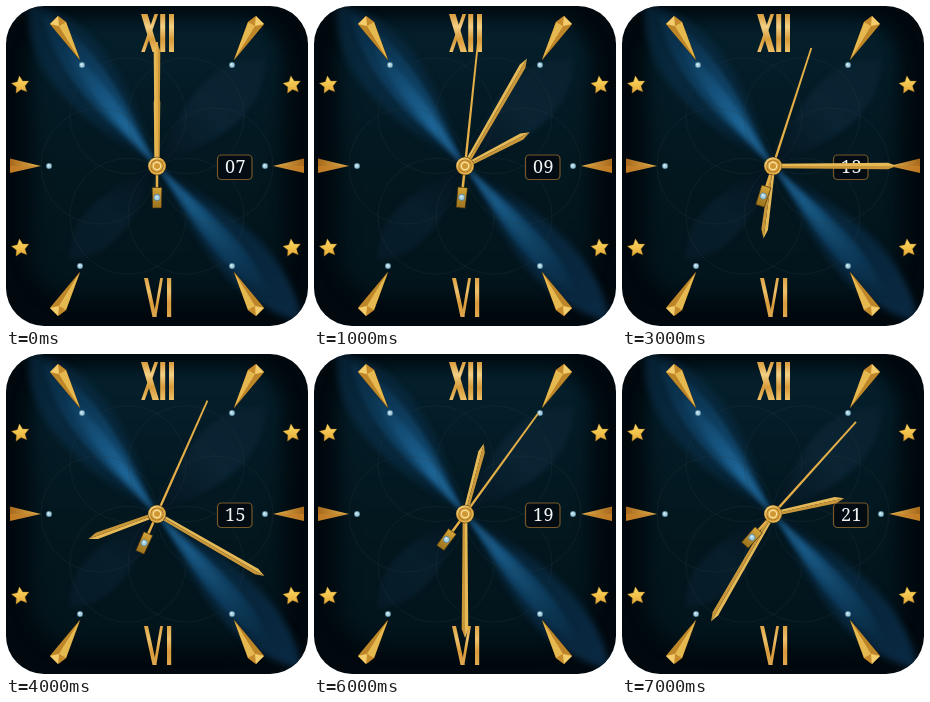
An HTML page with a canvas for the animation above (8 s loop, 302 px wide and 320 px high).

```html
<!DOCTYPE html>
<html lang="en">
<head>
<meta charset="utf-8">
<title>Deco watch face</title>
<style>
html, body { margin: 0; width: 100%; height: 100%; overflow: hidden; background: #fff; }
canvas { display: block; width: 302px; height: 320px; }
</style>
</head>
<body>
<canvas id="face" width="302" height="320"></canvas>
<script>
const W = 302, H = 320, CX = 151, CY = 160, RAD = Math.PI / 180;
const STEP = 1000, STEPS = 8;
const LIGHT = '#f3cc6c', GOLD = '#dda53d', EDGE = '#3b2809';

const view = document.getElementById('face').getContext('2d');
const dial = document.createElement('canvas');
dial.width = W;
dial.height = H;

function poly(c, points, fill, stroke, width = 0.6) {
  c.beginPath();
  points.forEach(([x, y]) => c.lineTo(x, y));
  c.closePath();
  if (fill) { c.fillStyle = fill; c.fill(); }
  if (stroke) { c.strokeStyle = stroke; c.lineWidth = width; c.stroke(); }
}

function disc(c, x, y, r, fill) {
  c.beginPath();
  c.arc(x, y, r, 0, 2 * Math.PI);
  c.fillStyle = fill;
  c.fill();
}

function ramp(c, x0, y0, x1, y1, colors) {
  const g = c.createLinearGradient(x0, y0, x1, y1);
  colors.forEach((color, i) => g.addColorStop(i / (colors.length - 1), color));
  return g;
}

// Calls draw with the centre as origin and "up" pointing along a clock angle.
function turned(c, degrees, draw) {
  c.save();
  c.translate(CX, CY);
  c.rotate(degrees * RAD);
  draw();
  c.restore();
}

function petal(c, degrees, length, half, colors, blur = 2) {
  turned(c, degrees, () => {
    c.filter = `blur(${blur}px)`;
    c.beginPath();
    c.moveTo(0, 0);
    c.bezierCurveTo(-half * 0.5, -length * 0.25, -half * 1.7, -length * 0.7, 0, -length);
    c.bezierCurveTo(half * 1.7, -length * 0.7, half * 0.5, -length * 0.25, 0, 0);
    c.fillStyle = ramp(c, 0, 0, 0, -length, colors);
    c.fill();
  });
}

function backdrop(c) {
  c.fillStyle = '#01090e';
  c.fillRect(0, 0, W, H);
  c.save();
  c.filter = 'blur(9px)';
  c.fillStyle = ramp(c, 0, 0, 0, H, ['#04202d', '#03171f', '#02131a']);
  c.beginPath();
  c.roundRect(25, 12, W - 50, H - 40, 45);
  c.fill();
  c.restore();

  petal(c, 45, 152, 29, ['#04141f', '#0a2433', '#09212f']);
  petal(c, -137, 128, 23, ['#03131d', '#071e2b', '#061b27']);
  petal(c, -38.5, 206, 34, ['#051c2b', '#072639', '#08283d', '#061f30'], 3);
  petal(c, -37, 188, 18, ['#0b3452', '#10456a', '#0d3a5a', '#082a41']);
  petal(c, -37.5, 150, 8, ['#1a557f', '#1d6596', '#144f78', '#0d3a58']);
  petal(c, 137, 212, 27, ['#051a29', '#072539', '#08273e', '#0a2942'], 3);
  petal(c, 139, 170, 13, ['#0c3656', '#10456b', '#0d3b5c', '#08283e']);
  petal(c, 139, 138, 6, ['#1a557f', '#195a87', '#124769', '#0b324d']);

  c.lineWidth = 0.7;
  c.strokeStyle = 'rgba(40, 62, 70, 0.38)';
  for (let i = 0; i < 6; i++) {
    const a = i * 60 * RAD;
    c.beginPath();
    c.arc(CX + 58 * Math.cos(a), CY + 58 * Math.sin(a), 58, 0, 2 * Math.PI);
    c.stroke();
  }
}

function crystal(c) {
  const top = [52, 10], right = [60, 16], left = [44, 18], tip = [74, 54], mid = [53, 20];
  poly(c, [top, right, tip, left], GOLD, EDGE);
  poly(c, [left, mid, tip], '#bd8628');
  poly(c, [mid, right, tip], '#e6b850');
  poly(c, [top, right, mid], '#c58b2c');
  poly(c, [top, mid, left], LIGHT);
}

function star(c, x, y) {
  const points = Array.from({ length: 10 }, (_, k) => {
    const a = (-97 + k * 36) * RAD, r = k % 2 ? 4.6 : 9.3;
    return [x + r * Math.cos(a), y + r * Math.sin(a)];
  });
  poly(c, points, ramp(c, x, y - 9, x, y + 9, ['#f9d868', '#f2c24b', '#dda337']), '#8a5d18', 0.4);
}

function gem(c, x, y, r = 3) {
  disc(c, x, y, r, '#5d8ba2');
  disc(c, x, y, r - 0.8, '#a9d0df');
  disc(c, x - 0.6, y - 0.7, 0.9, '#e3f5fa');
}

function bar(c, x0, x1, y0, y1, w, fill) {
  poly(c, [[x0, y0], [x0 + w, y0], [x1 + w, y1], [x1, y1]], fill);
}

function numerals(c) {
  const upper = ramp(c, 0, 8, 0, 46, ['#d99b3c', '#f3d084', '#d89b3a', '#eec068']);
  bar(c, 148.5, 135.2, 8, 46, 3.6, upper);
  bar(c, 135, 146.5, 8, 46, 6.5, upper);
  bar(c, 154.2, 154.2, 8, 46, 5, upper);
  bar(c, 163, 163, 8, 46, 5, upper);
  const lower = ramp(c, 0, 272, 0, 311, ['#dda445', '#eec06a', '#d99a3a', '#e0a850']);
  bar(c, 154.2, 147.5, 272, 311, 2.8, lower);
  bar(c, 138, 146.5, 272, 311, 4, lower);
  bar(c, 161, 161, 272, 311, 4.2, lower);
}

function buildDial() {
  const c = dial.getContext('2d');
  c.beginPath();
  c.roundRect(0, 0, W, H, 38);
  c.clip();
  backdrop(c);
  numerals(c);
  for (const flipX of [false, true]) {
    for (const flipY of [false, true]) {
      c.save();
      c.translate(flipX ? W : 0, flipY ? H : 0);
      c.scale(flipX ? -1 : 1, flipY ? -1 : 1);
      crystal(c);
      c.restore();
      gem(c, flipX ? 226 : flipY ? 74 : 76, flipY ? 260 : 59);
      star(c, flipX ? 286 : 14.5, flipY ? 242 : 79);
    }
  }
  for (const [base, tip] of [[4, 35], [298, 267]]) {
    poly(c, [[base, 152.5], [tip, 160], [base, 160]], ramp(c, base, 0, tip, 0, ['#a8691c', '#e0b04c']));
    poly(c, [[base, 160], [tip, 160], [base, 167]], ramp(c, base, 0, tip, 0, ['#c07a22', '#c9913a']));
  }
  gem(c, 43, 160);
  gem(c, 259, 160);
  c.beginPath();
  c.roundRect(211.5, 149, 34.5, 24.5, 4);
  c.fillStyle = '#020c12';
  c.fill();
  c.strokeStyle = '#76582a';
  c.lineWidth = 1.2;
  c.stroke();
}

function hand(c, degrees, length) {
  turned(c, degrees, () => {
    const neck = -length + 9;
    poly(c, [[-2.3, 0], [-3.3, neck], [0, -length], [0, 0]], '#e6b957');
    poly(c, [[2.3, 0], [3.3, neck], [0, -length], [0, 0]], '#c9973a');
  });
}

function secondHand(c, degrees) {
  turned(c, degrees, () => {
    poly(c, [[-1.3, 24], [-0.9, -124], [0.9, -124], [1.3, 24]], '#e4ae48');
    poly(c, [[-4.8, 21.5], [4.8, 21.5], [4.5, 42], [-4.5, 42]],
      ramp(c, 0, 21, 0, 42, ['#d6a63a', '#b68a28', '#9c7520']), EDGE);
    gem(c, 0, 31.5, 3.4);
  });
}

function hub(c) {
  disc(c, CX, CY, 9.2, EDGE);
  disc(c, CX, CY, 8.8, ramp(c, 145, 152, 157, 168, ['#f7d581', '#d9a341', '#e9ba58']));
  disc(c, CX, CY, 6.6, '#a06f20');
  disc(c, CX, CY, 5.8, '#dfa945');
  disc(c, CX, CY, 4.2, '#fae3a2');
  disc(c, CX, CY, 3, '#cf9632');
}

function draw(now) {
  const tick = Math.floor(now / STEP) % STEPS;
  view.clearRect(0, 0, W, H);
  view.drawImage(dial, 0, 0);
  view.font = '18px "Noto Serif", serif';
  view.letterSpacing = '0.5px';
  view.textAlign = 'center';
  view.fillStyle = '#f4f5f5';
  view.fillText(String(7 + tick * 2).padStart(2, '0'), 229.5, 167);
  // Each tick advances the clock by 2 days, 2 hours, 5 minutes and 1 second.
  hand(view, tick * 62.5, 73);
  hand(view, tick * 30, 124);
  secondHand(view, tick * 6);
  hub(view);
}

buildDial();
const start = performance.now();
function frame() {
  draw(performance.now() - start);
  requestAnimationFrame(frame);
}
frame();
</script>
</body>
</html>
```
